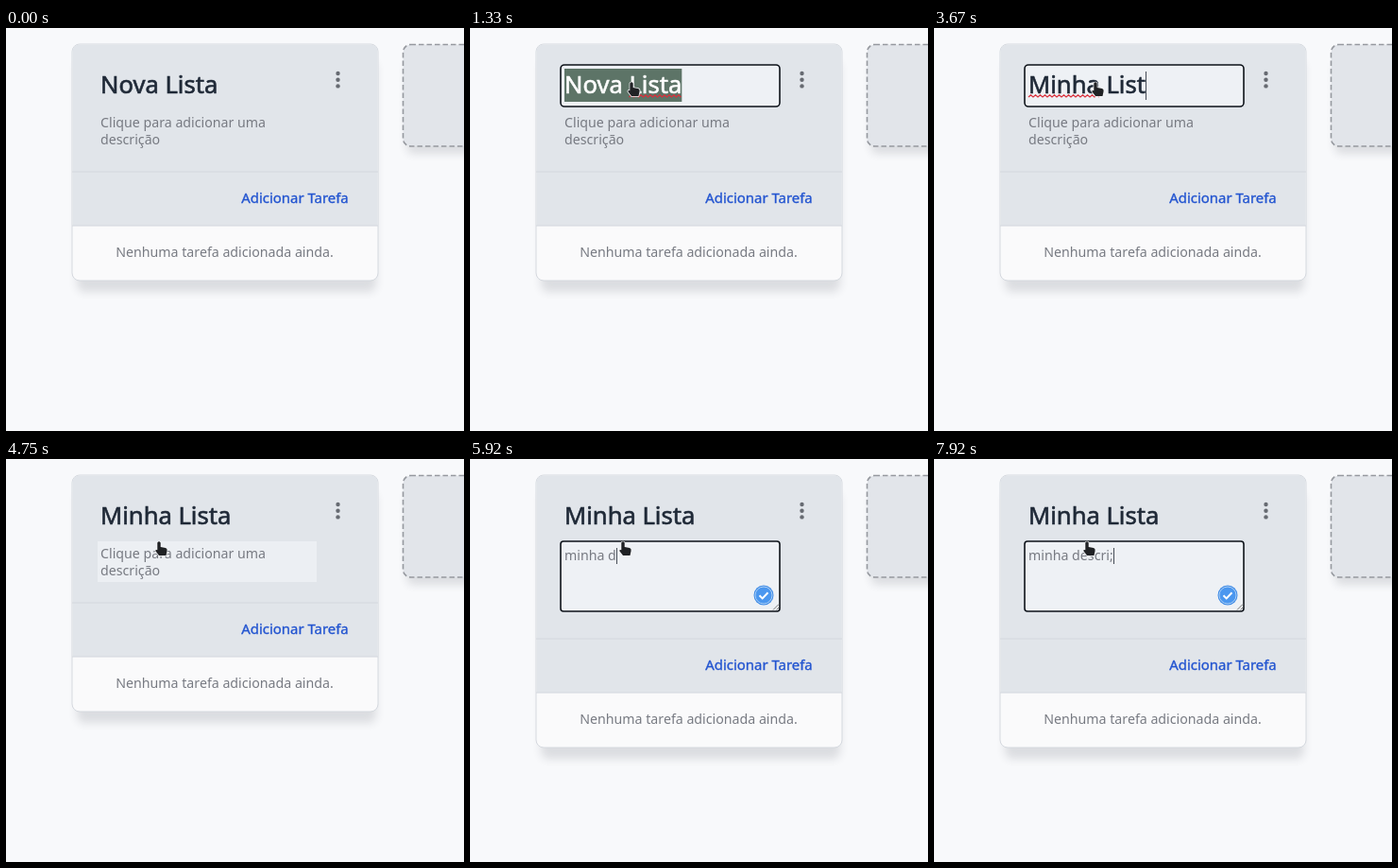
An HTML page for the animation above (8 s loop, 485 by 426 pixels).

```html
<!DOCTYPE html>
<html lang="pt">
<head>
<meta charset="utf-8">
<style>
  html, body { margin: 0; width: 100%; height: 100%; overflow: hidden; background: #f8f9fb; }
  svg { display: block; width: 485px; height: 426px; }
  text { font: 14.2px "Noto Sans", "Open Sans", sans-serif; fill: #777a82; white-space: pre; }
  .title { font-size: 25.6px; fill: #1f2937; stroke: #1f2937; stroke-width: .6; }
  .title.selected { fill: #fff; stroke: #fff; }
  .link { font-size: 14.9px; fill: #2355d0; stroke: #2355d0; stroke-width: .35; }
  .hover { fill: #eceff3; }
  .field { fill: #eef1f5; stroke: #0e131a; stroke-width: 1.6; }
  .caret { stroke: #444b55; stroke-width: 1; }
  .line { stroke: #d3d7dd; }
  .shadow { fill: #1e2332; opacity: .13; filter: blur(5px); }
  .pointer { fill: #202225; stroke: #f4f5f7; stroke-width: 1.4; paint-order: stroke; stroke-linejoin: round; }
</style>
</head>
<body>
<svg viewBox="0 0 485 426">
  <rect id="shadow" class="shadow" x="75" y="35" width="317" rx="8"/>
  <rect id="card" x="70" y="17" width="324" rx="8" fill="#fafafb" stroke="#d5d9df"/>
  <path id="header" fill="#e1e5ea"/>
  <rect class="shadow" x="424" y="35" width="100" height="98" rx="8"/>
  <rect x="420.5" y="17.5" width="100" height="107.5" rx="8" fill="#e2e5ea" stroke="#96999f" stroke-width="1.6" stroke-dasharray="5.5 3"/>
  <g fill="#676b72">
    <circle cx="351.5" cy="48" r="2.2"/><circle cx="351.5" cy="54.7" r="2.2"/><circle cx="351.5" cy="61.4" r="2.2"/>
  </g>

  <g id="lower">
    <path class="line" d="M70 152H394M70 209H394"/>
    <text class="link" x="306" y="185" text-anchor="middle">Adicionar Tarefa</text>
    <text x="231.5" y="242" text-anchor="middle">Nenhuma tarefa adicionada ainda.</text>
  </g>

  <rect id="titleHover" class="hover" x="96" y="39" width="233" height="44"/>
  <rect id="titleField" class="field" x="96" y="39" width="232" height="44" rx="4"/>
  <rect id="selection" x="100" y="43" height="35" fill="#5d7467"/>
  <text id="title" class="title" x="100" y="69"></text>
  <path id="squiggle" fill="none" stroke="#d9303c" stroke-width="1.3"/>
  <path id="titleCaret" class="caret" d="M.5 46V76"/>

  <g id="hint">
    <rect id="hintHover" class="hover" x="97" y="87" width="232" height="43"/>
    <text x="100" y="105">Clique para adicionar uma</text>
    <text x="100" y="123">descrição</text>
  </g>
  <g id="area">
    <rect class="field" x="96" y="87" width="232" height="74" rx="3"/>
    <circle cx="311" cy="144" r="10.5" fill="#3f8be6"/>
    <circle cx="311" cy="144" r="9" fill="#4b97ef" stroke="#b9d7f7" stroke-width=".9"/>
    <path d="M306.5 144.2l3.2 3.2 5.8-6.2" fill="none" stroke="#fff" stroke-width="2"/>
    <path d="M321 159.5l6-6M324.5 159.5l2.5-2.5" stroke="#777"/>
    <text id="note" x="100" y="107"></text>
    <path id="noteCaret" class="caret" d="M.5 94V111"/>
  </g>
  <path id="arrow" class="pointer" d="M0 0V14L3.3 11 5.5 16 8 15 5.8 10H10Z"/>
  <path id="hand" class="pointer" d="M-1.7 1.5Q0-.8 1.7 1.5V6l5.3 1Q9 7.5 8.6 10L7.5 15H0L-3.8 10Q-3.4 8.2-1.7 9.3Z"/>
</svg>
<script>
const LOOP = 8000;
const SELECT = 1250, SAVE = 4080, OPEN = 5000;

// [time, text]
const titleKeys = [
  [0, "Nova Lista"], [1830, "M"], [1920, "Mi"], [2000, "Min"], [2080, "Minh"],
  [2170, "Minha"], [2250, "Minhas"], [2420, "Minhas "], [2830, "Minhas"],
  [3000, "Minha"], [3170, "Minha "], [3330, "Minha L"], [3420, "Minha Li"],
  [3500, "Minha Lis"], [3580, "Minha List"], [3750, "Minha Lista"]
];
const noteKeys = [
  [OPEN, ""], [5420, "m"], [5500, "mi"], [5580, "min"], [5670, "minh"],
  [5750, "minha"], [5830, "minha "], [5920, "minha d"], [6080, "minha de"],
  [6500, "minha des"], [6670, "minha desc"], [6830, "minha descr"],
  [7000, "minha descri"], [7420, "minha descri;"]
];
// [time, x, y]
const route = [
  [330, 500, 140], [830, 409, 174], [1130, 171, 57],
  [4330, 171, 57], [4580, 162, 87], [LOOP, 162, 87]
];

const el = {};
document.querySelectorAll("[id]").forEach(node => el[node.id] = node);

const show = (node, on) => node.style.display = on ? "" : "none";
const latest = (keys, t) => keys.filter(k => k[0] <= t).pop() || keys[0];
const setText = (node, s) => {
  const text = s.replace(/ /g, "\u00a0");
  if (node.textContent !== text) node.textContent = text;
};
const widthOf = (node, from, count) => count ? node.getSubStringLength(from, count) : 0;
const moveTo = (node, x, y) => node.setAttribute("transform", `translate(${x} ${y})`);

function wave(x, width) {
  let d = `M${x} 73`;
  for (let i = 1; i * 2.5 <= width; i++) d += `l2.5 ${i % 2 ? -2.2 : 2.2}`;
  return d;
}

function pointerAt(t) {
  const i = Math.max(0, route.findLastIndex(p => p[0] <= t));
  const a = route[i], b = route[i + 1] || a;
  const u = Math.min(1, Math.max(0, (t - a[0]) / (b[0] - a[0] || 1)));
  const k = u * u * (3 - 2 * u);
  return [a[1] + (b[1] - a[1]) * k, a[2] + (b[2] - a[2]) * k];
}

function drawCaret(caret, node, text, since, on) {
  show(caret, on && since % 1060 < 530);
  if (on) moveTo(caret, 100 + Math.round(widthOf(node, 0, text.length)), 0);
}

function drawTitle(t, overTitle) {
  const [since, text] = latest(titleKeys, t);
  const editing = t >= SELECT && t < SAVE;
  const selected = editing && since === 0;
  setText(el.title, text);
  el.title.classList.toggle("selected", selected);
  show(el.titleHover, overTitle && !editing);
  show(el.titleField, editing);
  show(el.selection, selected);
  if (selected) el.selection.setAttribute("width", widthOf(el.title, 0, text.length));

  const word = /^Minhas?(?= )/.exec(text) || (selected && /Lista/.exec(text));
  show(el.squiggle, editing && word);
  if (editing && word) {
    const x = 100 + widthOf(el.title, 0, word.index);
    el.squiggle.setAttribute("d", wave(x, widthOf(el.title, word.index, word[0].length)));
  }
  drawCaret(el.titleCaret, el.title, text, t - since, editing && !selected);
}

function drawNote(t, overHint) {
  const open = t >= OPEN;
  const shift = open ? 38 : 0;
  const [since, text] = latest(noteKeys, t);
  show(el.hint, !open);
  show(el.hintHover, overHint);
  show(el.area, open);
  setText(el.note, text);
  drawCaret(el.noteCaret, el.note, text, t - since, open);
  el.card.setAttribute("height", 250 + shift);
  el.shadow.setAttribute("height", 244 + shift);
  el.header.setAttribute("d", `M70.5 ${209 + shift}V25q0-7.5 7.5-7.5H386q7.5 0 7.5 7.5V${209 + shift}Z`);
  moveTo(el.lower, 0, shift);
}

function draw(t) {
  const [x, y] = pointerAt(t);
  const inside = (top, bottom) => t > 830 && x > 96 && x < 329 && y >= top && y <= bottom;
  const overTitle = inside(39, 83), overHint = inside(85, 130);
  drawTitle(t, overTitle);
  drawNote(t, overHint);
  const hand = overTitle || overHint || t > 4330;
  show(el.hand, hand);
  show(el.arrow, !hand && t >= 330);
  moveTo(hand ? el.hand : el.arrow, x, y);
}

const start = performance.now();
function tick() {
  draw((performance.now() - start) % LOOP);
  requestAnimationFrame(tick);
}
tick();
</script>
</body>
</html>
```
